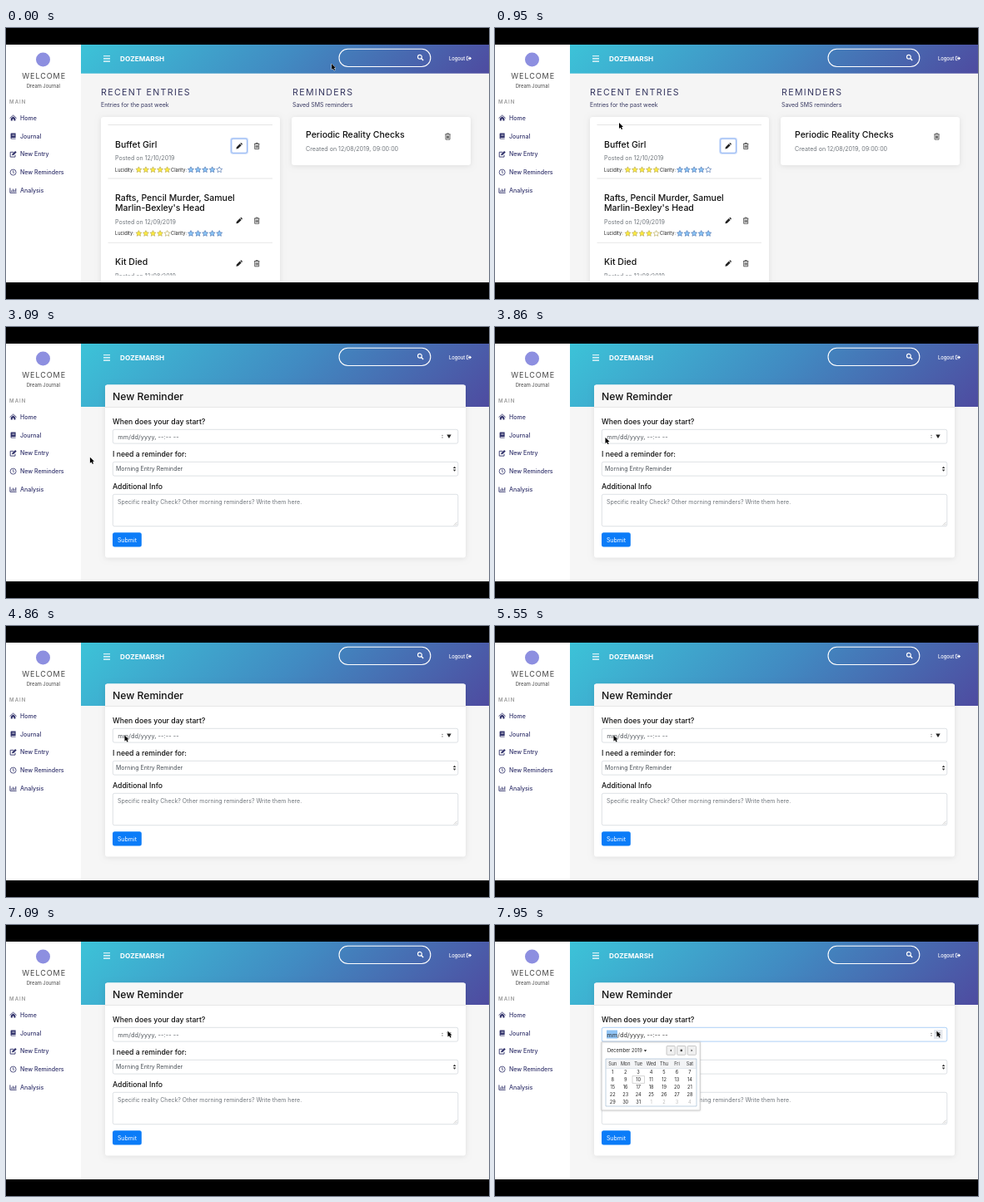
An HTML page with a canvas for the animation above (8 s loop, 580x326 px).

```html
<!DOCTYPE html>
<html lang="en">
<head>
<meta charset="utf-8">
<title>Dream Journal</title>
<style>
html, body { margin: 0; width: 100%; height: 100%; overflow: hidden; background: #000; }
canvas { display: block; width: 580px; height: 326px; }
</style>
</head>
<body>
<canvas id="stage"></canvas>
<script>
const LOOP = 8000, W = 580, H = 326;
const BLUR_AT = 2230, PAGE_AT = 2640, CALENDAR_AT = 7250;
const INK = '#111', NAVY = '#35365f', GREY = '#70767c', LINE = '#ced4da';

const canvas = document.getElementById('stage');
const ctx = canvas.getContext('2d');
const scale = window.devicePixelRatio || 1;
canvas.width = W * scale;
canvas.height = H * scale;

// Pointer path: [time, x, y], eased between stops.
const PATH = [
  [0, 391, 43], [100, 391, 43], [850, 149, 114], [1000, 149, 114],
  [1450, 82, 171], [2800, 82, 171], [3500, 132.5, 133], [4050, 132.5, 133],
  [4400, 142.5, 131.5], [6350, 142.5, 131.5], [7050, 530.5, 127.5], [8000, 530.5, 127.5]
];

function pointer(t) {
  const i = Math.max(1, PATH.findIndex(p => p[0] > t));
  const a = PATH[i - 1], b = PATH[i];
  const k = (t - a[0]) / (b[0] - a[0]);
  const e = k * k * (3 - 2 * k);
  return { x: a[1] + (b[1] - a[1]) * e, y: a[2] + (b[2] - a[2]) * e };
}

function text(str, x, y, size, color = INK, { weight = 400, gap = 0, align = 'left' } = {}) {
  ctx.font = `${weight} ${size}px Inter, sans-serif`;
  ctx.letterSpacing = gap + 'px';
  ctx.textAlign = align;
  ctx.fillStyle = color;
  ctx.fillText(str, x, y);
}

function rect(x, y, w, h, fill) {
  ctx.fillStyle = fill;
  ctx.fillRect(x, y, w, h);
}

function box(x, y, w, h, r, fill, stroke, lw = 0.7) {
  ctx.beginPath();
  ctx.roundRect(x, y, w, h, r);
  if (fill) { ctx.fillStyle = fill; ctx.fill(); }
  if (stroke) { ctx.strokeStyle = stroke; ctx.lineWidth = lw; ctx.stroke(); }
}

function card(x, y, w, h, r = 3) {
  ctx.save();
  ctx.shadowColor = 'rgba(0,0,0,.09)';
  ctx.shadowBlur = 6 * scale;
  ctx.shadowOffsetY = scale;
  box(x, y, w, h, r, '#fff');
  ctx.restore();
}

function path(d, x, y, fill, stroke, lw = 0.8) {
  const p = new Path2D(d);
  ctx.save();
  ctx.translate(x, y);
  if (fill) { ctx.fillStyle = fill; ctx.fill(p); }
  if (stroke) { ctx.strokeStyle = stroke; ctx.lineWidth = lw; ctx.stroke(p); }
  ctx.restore();
}

const ICONS = {
  home(x, y, c) {
    path('M-4 .3L0-3.2L4 .3', x, y, null, c, 0.9);
    path('M-2.8.6L0-1.8L2.8.6V3.4H.8V1.2H-.8V3.4H-2.8Z', x, y, c);
  },
  book(x, y, c) {
    path('M-3-2.7Q-3-3.5-2.2-3.5H3V1.9H-2V2.7H3V3.5H-2.2Q-3 3.5-3 2.7Z', x, y, c);
    path('M-1.3-1.7H1.8M-1.3-.4H1.8', x, y, null, '#fff', 0.5);
  },
  edit(x, y, c) {
    path('M.6-2.5H-3.4V3.3H2.4V.8', x, y, null, c, 0.9);
    path('M-1.4 1.4L-1.1-.3L2.5-3.9L4.1-2.3L.4 1.2Z', x, y, c);
  },
  clock(x, y, c) {
    path('M3.5 0A3.5 3.5 0 1 1-3.5 0A3.5 3.5 0 1 1 3.5 0M0-2.2V.2L1.4 1.2', x, y, null, c);
  },
  chart(x, y, c) {
    path('M-3.7-3V2.9H4M-1.9 1.8V0M-.2 1.8V-1.8M1.5 1.8V-.7M3.2 1.8V-2.4', x, y, null, c, 0.9);
  }
};

function pencil(x, y) {
  path('M-3.6 3.6L-3.1 1.2L.8-2.7L2.7-.8L-1.2 3.1ZM1.3-3.2L2-3.8Q2.5-4 3-3.5L3.6-2.9Q4-2.4 3.7-1.9L3.2-1.3Z', x, y, '#222');
}

function trash(x, y) {
  path('M-3.2-2.6H3.2M-1.2-2.7V-3.6H1.2V-2.7M-2.5-2.6V3.6H2.5V-2.6M-1.1-1V2.3M0-1V2.3M1.1-1V2.3', x, y, null, '#333', 0.75);
}

function star(x, y, fill, stroke) {
  ctx.beginPath();
  for (let i = 0; i < 10; i++) {
    const r = i % 2 ? 1.8 : 3.7, a = -Math.PI / 2 + i * Math.PI / 5;
    ctx.lineTo(x + r * Math.cos(a), y + r * Math.sin(a));
  }
  ctx.closePath();
  ctx.fillStyle = fill;
  ctx.fill();
  ctx.strokeStyle = stroke;
  ctx.lineWidth = 0.7;
  ctx.stroke();
}

function rating(label, x, starX, y, count, fill, stroke) {
  text(label, x, y + 2, 5.7, '#222');
  for (let i = 0; i < 5; i++) star(starX + i * 8.55, y, i < count ? fill : '#fff', stroke);
}

function sidebar(hover) {
  rect(0, 20, 90, 286, '#fff');
  ctx.beginPath();
  ctx.arc(44.5, 38, 8.5, 0, 7);
  ctx.fillStyle = '#8d8fe0';
  ctx.fill();
  text('WELCOME', 19.3, 61, 9, '#444', { gap: 0.95 });
  text('Dream Journal', 44.8, 71.6, 5.8, '#444', { align: 'center' });
  text('MAIN', 4, 91.4, 6, '#999', { weight: 600, gap: 1.1 });
  const items = [['home', 'Home'], ['book', 'Journal'], ['edit', 'New Entry'],
    ['clock', 'New Reminders'], ['chart', 'Analysis']];
  items.forEach(([icon, label], i) => {
    const y = 108.2 + i * 21.8, on = i === 3 && hover;
    if (on) rect(0, y - 10.8, 90, 21.6, '#a9dae4');
    const color = on ? '#fff' : '#30316a';
    ICONS[icon](8.6, y, color);
    text(label, 17, y + 2.6, 7, color, { weight: 500 });
  });
}

function topBar(h) {
  const w = 490, d = (w + h) / 4;
  const cx = 90 + w / 2, cy = 20 + h / 2;
  const g = ctx.createLinearGradient(cx - d, cy - d, cx + d, cy + d);
  g.addColorStop(0, '#3cc3d8');
  g.addColorStop(0.5, '#418bc2');
  g.addColorStop(1, '#4e4ba0');
  rect(90, 20, w, h, g);
  path('M0 0H8M0 3.2H8M0 6.4H8', 117, 33.7, null, '#fff', 1.1);
  text('DOZEMARSH', 137, 40, 8.2, '#fff', { weight: 700 });
  box(400, 25.3, 109.8, 21.2, 10.6, null, '#fff', 1.1);
  path('M2 0A2.4 2.4 0 1 1-2.8 0A2.4 2.4 0 1 1 2 0', 497.3, 34.8, null, '#fff', 1.2);
  path('M1.4 1.7L3.8 4.1', 497.3, 34.8, null, '#fff', 1.4);
  text('Logout', 532, 38.6, 5.8, '#fff', { weight: 500 });
  path('M2-2.2H0V2.2H2', 553.3, 36.5, null, '#fff', 0.8);
  path('M1.6-.7H3.3V-2.2L5.8 0L3.3 2.2V.7H1.6Z', 553.3, 36.5, '#fff');
}

function entry(y, lines, date, lucid, clear) {
  lines.forEach((s, i) => text(s, 131, y + i * 12.3, 10.5, INK, { weight: 500 }));
  const low = y + (lines.length - 1) * 12.3;
  text('Posted on ' + date, 131, low + 15.6, 7.1, GREY);
  rating('Lucidity:', 131, 159.4, low + 27, lucid, '#ffec3d', '#b9ac5c');
  rating('Clarity:', 198, 222, low + 27, clear, '#8cc6f7', '#5279b4');
}

function dashboard(focus) {
  rect(90, 20, 490, 286, '#f5f5f5');
  topBar(34.7);
  text('RECENT ENTRIES', 114, 81.4, 10.6, NAVY, { gap: 1.35 });
  text('Entries for the past week', 114, 95.3, 6.95, NAVY);
  text('REMINDERS', 344, 81.4, 10.6, NAVY, { gap: 1.35 });
  text('Saved SMS reminders', 344, 95.3, 6.95, NAVY);

  card(114, 107, 215, 210);
  ctx.save();
  ctx.beginPath();
  ctx.rect(114, 107, 215, 190.7);
  ctx.clip();
  for (const y of [116.2, 180.6, 257.8]) rect(122.5, y, 197.5, 0.8, '#dfdfdf');
  entry(143.6, ['Buffet Girl'], '12/10/2019', 5, 4);
  entry(208, ['Rafts, Pencil Murder, Samuel', "Marlin-Bexley's Head"], '12/09/2019', 4, 5);
  entry(285.2, ['Kit Died'], '12/08/2019', 3, 3);
  ctx.restore();
  if (focus) {
    box(270.3, 132.8, 19.6, 18, 2.2, '#fff', '#c3d7fa', 2);
    box(270.8, 133.3, 18.6, 17, 2, null, '#7fa6ee', 0.6);
  }
  for (const y of [142, 231.7, 283.2]) { pencil(280, y); trash(301.2, y); }

  card(343, 107, 215, 58);
  text('Periodic Reality Checks', 360, 132.2, 10.5, INK, { weight: 500 });
  text('Created on 12/08/2019, 09:00:00', 360, 148, 7.1, GREY);
  trash(530.5, 130.5);
}

function calendar() {
  ctx.save();
  ctx.shadowColor = 'rgba(0,0,0,.2)';
  ctx.shadowBlur = 3 * scale;
  box(128, 140.8, 118.3, 82.2, 0, '#fff', '#bbb', 0.6);
  ctx.restore();
  text('December 2019', 135, 153.1, 5.6, '#222');
  path('M-1.7-1H1.7L0 1.3Z', 180.5, 151.3, '#222');
  const arrows = ['M.8-1.3L-1 0L.8 1.3Z', 'M1.3 0A1.3 1.3 0 1 1-1.3 0A1.3 1.3 0 1 1 1.3 0', 'M-.8-1.3L1 0L-.8 1.3Z'];
  arrows.forEach((d, i) => {
    const x = 206 + i * 12.6;
    box(x, 145.5, 10.3, 10.8, 1, '#f0f0f0', '#aaa', 0.6);
    path(d, x + 5.15, 150.9, '#444');
  });
  rect(133, 161, 109, 11.4, '#f3f4f6');
  box(133, 161, 109, 57, 0, null, '#a5bdd5', 0.7);
  rect(133, 172, 109, 0.6, '#d3dce6');
  const col = i => 141.2 + i * 15.45;
  ['Sun', 'Mon', 'Tue', 'Wed', 'Thu', 'Fri', 'Sat'].forEach((d, i) =>
    text(d, col(i), 169, 5.5, '#333', { align: 'center' }));
  box(165, 181.6, 14.5, 8.8, 0, null, '#bbb', 0.6);
  for (let i = 0; i < 35; i++) {
    const next = i > 30;
    text(String(next ? i - 30 : i + 1), col(i % 7), 179.1 + Math.floor(i / 7) * 9, 5.6,
      next ? '#bbb' : '#222', { align: 'center' });
  }
}

function form(open) {
  rect(90, 20, 490, 286, '#f6f6f6');
  topBar(76);
  card(119, 69.5, 433, 208);
  box(119, 69.5, 433, 27, [3, 3, 0, 0], '#f7f7f7');
  rect(119, 96.2, 433, 0.7, '#dfdfdf');
  text('New Reminder', 128, 87.6, 12.2, INK, { weight: 500 });
  const label = { weight: 500 };
  text('When does your day start?', 128, 117.3, 8.7, INK, label);
  text('I need a reminder for:', 128, 156.3, 8.7, INK, label);
  text('Additional Info', 128, 194.8, 8.7, INK, label);

  box(128.3, 123.3, 414.5, 16.8, 2, '#fff', open ? '#8bbdf2' : LINE);
  if (open) {
    rect(134, 126.5, 13, 10, '#8fc3f5');
    rect(527, 126, 10.5, 11, '#e6e9ee');
  }
  text('mm/dd/yyyy, --:-- --', 134.2, 134.5, 7.3, open ? '#333' : '#50565c', { gap: 0.1 });
  path('M-1.1-.8L0-2.2L1.1-.8ZM-1.1.8L0 2.2L1.1.8Z', 524, 131.7, '#888');
  path('M-2.7-2H2.7L0 2.5Z', 532, 131.6, '#222');

  box(128.3, 162.3, 414.5, 16.8, 2, '#fff', LINE);
  text('Morning Entry Reminder', 132, 173.3, 7, '#495057');
  path('M-1.8-.7L0-3L1.8-.7ZM-1.8.7L0 3L1.8.7Z', 538.6, 170.7, '#333');

  box(128.3, 201.3, 414.5, 38.4, 2, '#fff', LINE);
  text('Specific reality Check? Other morning reminders? Write them here.', 134, 212.6, 7, GREY);
  path('M-4 0L0-4M-1.8 0L0-1.8', 541.7, 238.7, null, '#999', 0.5);

  box(128, 247.2, 34.8, 17.4, 2.5, '#0b7cf8');
  text('Submit', 145.4, 258.6, 7, '#fff', { align: 'center' });
  if (open) calendar();
}

function status() {
  box(0, 297, 81, 9, [0, 2, 0, 0], '#3a4145');
  text('localhost:5000/reminderform', 1.8, 303.5, 5.5, '#e6e6e6');
}

function cursor({ x, y }, hand) {
  ctx.lineJoin = 'round';
  if (hand) {
    path('M-1 4V.6Q0-.6 1 .6V3.2L3.6 3.8Q4.5 4.1 4.3 5.2L3.5 8.2H-1.1L-3.3 5.2Q-3.4 4-2.3 4.3L-1 5.4Z', x, y, '#fff', '#222', 0.8);
  } else {
    path('M0 0V7L1.7 5.5L2.9 8.1L4.1 7.5L2.9 5H5Z', x, y, '#000', '#fff', 0.9);
    path('M0 0V7L1.7 5.5L2.9 8.1L4.1 7.5L2.9 5H5Z', x, y, '#000');
  }
  ctx.lineJoin = 'miter';
}

function draw(now) {
  const t = now % LOOP;
  const at = pointer(t);
  const hover = at.x < 90;
  ctx.setTransform(scale, 0, 0, scale, 0, 0);
  rect(0, 0, W, H, '#000');
  ctx.save();
  ctx.beginPath();
  ctx.rect(0, 20, W, 286);
  ctx.clip();
  if (t < PAGE_AT) dashboard(t < BLUR_AT);
  else form(t >= CALENDAR_AT);
  sidebar(hover);
  if (hover) status();
  cursor(at, hover);
  ctx.restore();
}

const start = performance.now();
function tick() {
  draw(performance.now() - start);
  requestAnimationFrame(tick);
}
tick();
</script>
</body>
</html>
```
